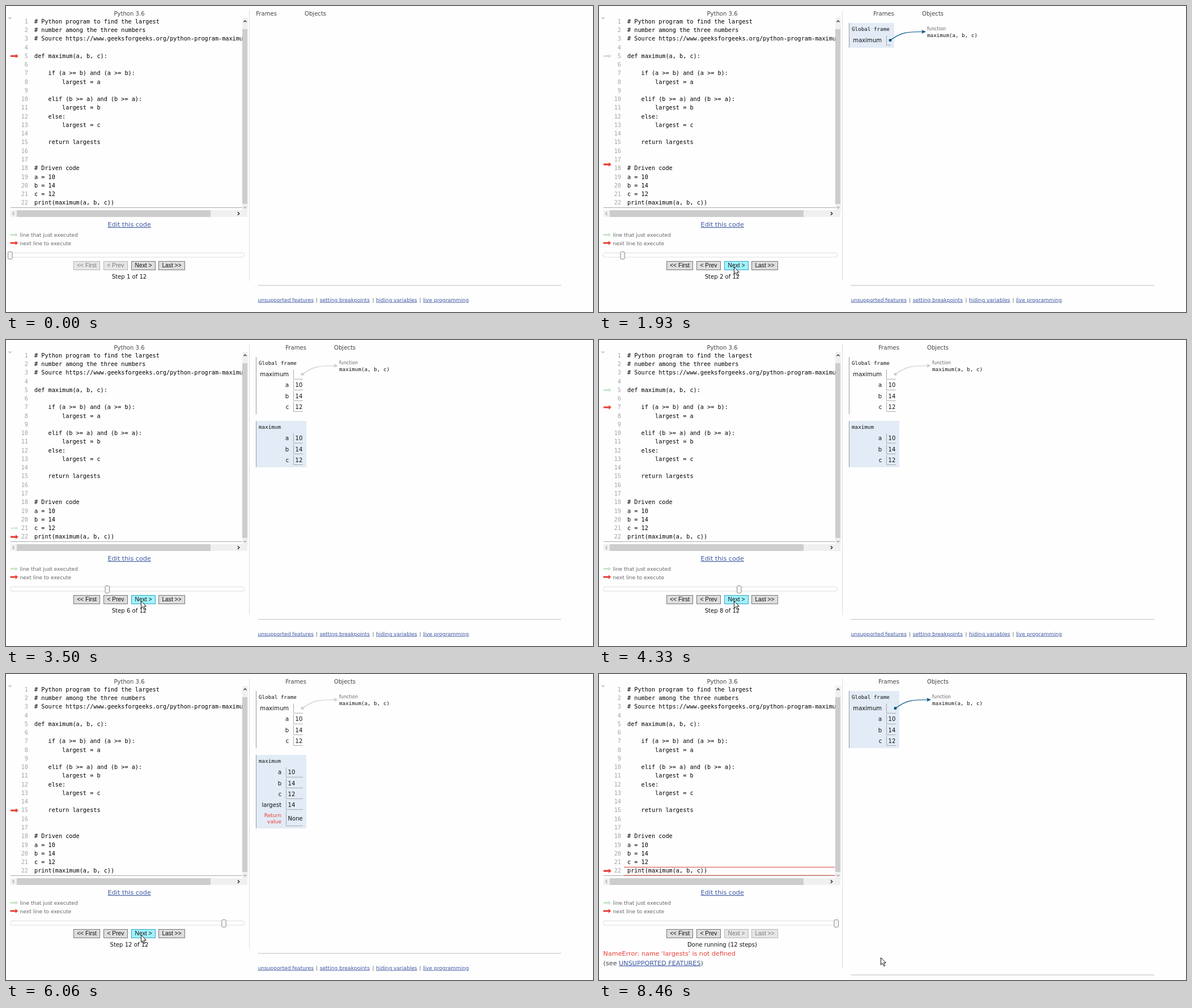
Write an HTML page that moves like this. It is 1036x541 px and loops after 8.5 s.

```html
<!DOCTYPE html>
<html lang="en">
<head>
<meta charset="utf-8">
<title>Code stepper</title>
<style>
html, body { margin: 0; width: 100%; height: 100%; overflow: hidden; background: #fefefe; }
svg { display: block; width: 1036px; height: 541px; }
text { white-space: pre; font-family: "DejaVu Sans", Verdana, sans-serif; font-size: 10.1px; fill: #111; }
.mono { font-family: "DejaVu Sans Mono", Consolas, monospace; }
.code { font-size: 10.2px; fill: #000; }
.num { font-size: 10.2px; fill: #a3a3a3; }
.small { font-size: 9.25px; }
.note { font-size: 9.12px; fill: #666; }
.head { fill: #444; }
.btn { font-family: "Liberation Sans", Arial, sans-serif; font-size: 10.25px; }
.link { fill: #3d58a2; text-decoration: underline; }
.big { font-size: 11.2px; }
</style>
</head>
<body>
<svg viewBox="0 0 1036 541" xmlns="http://www.w3.org/2000/svg">
  <defs>
    <clipPath id="clip"><rect x="0" y="0" width="416.5" height="361"/></clipPath>
    <polygon id="arrow" points="0,3 12,3 12,0 18,5 12,10 12,7 0,7" transform="scale(.765)"/>
  </defs>
  <g id="fixed"></g>
  <g id="view"></g>
  <use id="prev" href="#arrow" fill="#c9e6ca"/>
  <use id="next" href="#arrow" fill="#e93f34"/>
  <path id="cursor" d="M.5,.5V13.2L3.4,10.5L5.7,15.6L7.8,14.7L5.5,9.7H9.4Z" fill="#fff" stroke="#111" stroke-width="1"/>
</svg>
<script>
const LOOP = 8500;
const RED = "#e93f34";
const SOURCE = `# Python program to find the largest
# number among the three numbers
# Source https://www.geeksforgeeks.org/python-program-maximum-of-three-numbers/

def maximum(a, b, c):

    if (a >= b) and (a >= b):
        largest = a

    elif (b >= a) and (b >= a):
        largest = b
    else:
        largest = c

    return largests


# Driven code
a = 10
b = 14
c = 12
print(maximum(a, b, c))`.split("\n");

// Line to execute at each step, and the time of the click that leads to it
const LINES = [5, 19, 20, 21, 22, 5, 7, 10, 11, 15, 15, 15, 22];
const CLICKS = [0, 1555, 2080, 2580, 2990, 3440, 3870, 4325, 4790, 5260, 5660, 6055, 6850];
const PRESS = 130, FADE = 200, SLIDE = 250;
const LAST = LINES.length - 1;

const $ = id => document.getElementById(id);
const clamp = v => Math.max(0, Math.min(1, v));
const mix = (a, b, p) => a + (b - a) * p;
const inOut = p => p < .5 ? 4 * p ** 3 : 1 - 4 * (1 - p) ** 3;
const esc = s => s.replace(/&/g, "&amp;").replace(/</g, "&lt;").replace(/>/g, "&gt;");

const text = (x, y, s, cls = "", anchor = "start", extra = "") =>
  `<text x="${x}" y="${y}" class="${cls}" text-anchor="${anchor}" ${extra}>${esc(s)}</text>`;
const rect = (x, y, w, h, fill, extra = "") =>
  `<rect x="${x}" y="${y}" width="${w}" height="${h}" fill="${fill}" ${extra}/>`;
const path = (d, stroke, width = 1, extra = "") =>
  `<path d="${d}" fill="none" stroke="${stroke}" stroke-width="${width}" ${extra}/>`;

const baseline = n => 30.7 + (n - 1) * 15.27;
const arrowTop = n => 84.7 + (n - 5) * 15.27;

function drawFixed() {
  const code = SOURCE.map((s, i) =>
    text(39, baseline(i + 1), String(i + 1), "mono num", "end") +
    text(50, baseline(i + 1), s, "mono code")).join("");
  return text(217.5, 16.5, "Python 3.6", "head", "middle") +
    `<g clip-path="url(#clip)">${code}</g>` +
    path("M4.5,20L7,22.8L9.5,20", "#bbb", 1.4) +
    path("M8,356.5H417", "#aaa") +
    rect(417, 21, 10, 340, "#f0f0f0") + rect(417, 41, 9, 309, "#cdcdcd") +
    path("M419.5,28.5L422,25.8L424.5,28.5", "#444", 1.5) +
    path("M419.5,354.8L422,357.5L424.5,354.8", "#aaa", 1.3) +
    rect(8, 361, 418, 12, "#f0f0f0") + rect(19, 361, 342, 12, "#cdcdcd") +
    path("M14.5,364.3L11.8,367L14.5,369.7", "#aaa", 1.3) +
    path("M409,364.3L411.7,367L409,369.7", "#333", 1.6) +
    text(217.7, 390, "Edit this code", "link big", "middle") +
    `<use href="#arrow" x="0" y="0" transform="translate(7.5 400.7)" fill="#c9e6ca"/>` +
    `<use href="#arrow" transform="translate(7.5 415.2)" fill="${RED}"/>` +
    text(24.6, 408, "line that just executed", "note") +
    text(24.6, 422.7, "next line to execute", "note") +
    rect(7.5, 436.5, 413, 7.5, "#fff", 'rx="3" stroke="#ddd"');
}

function button(x, w, label, on, look) {
  const [fill, edge] = !on ? ["#e6e6e6", "#b5b5b5"]
    : look === "press" ? ["#33b2e4", "#2490bd"]
    : look === "hover" ? ["#a2f2fc", "#2fa3c8"] : ["#dddddd", "#777"];
  return rect(x, 451.5, w, 15, fill, `stroke="${edge}"`) +
    text(x + w / 2, 462.4, label, "btn", "middle", on ? "" : 'style="fill:#7a7a7a"');
}

function cell(right, sep, y, name, value, half = 8.5) {
  return text(sep - 8.3, y + 3.6, name, "", "end") +
    path(`M${sep},${y - half}V${y + half}H${right}`, "#aaa") +
    text(sep + 3, y + 3.6, value);
}

function box(y, bottom, right, title, active) {
  return (active ? rect(441, y, right - 441, bottom - y, "#e2ebf6") : "") +
    path(`M441.5,${y}V${bottom}`, "#999") +
    text(446, y + 13.8, title, "mono small");
}

function drawFrames(step) {
  const right = step === 0 ? 478 : step === 1 ? 521 : 530;
  let out = text(right, 16.5, "Frames", "head", "end") + text(right + 49, 16.5, "Objects", "head");
  if (!step) return out;

  const vars = [["a", "10"], ["b", "14"], ["c", "12"]];
  const globals = vars.slice(0, Math.min(3, step - 1));
  const inside = step >= 5 && step < LAST;
  const edge = right - 6;
  out += box(30, 73.8 + 19.1 * globals.length, right, "Global frame", !inside);
  out += cell(edge, 507.5, 60.8, "maximum", "");
  globals.forEach(([n, v], i) => out += cell(edge, 507.5, 79.8 + 19.1 * i, n, v));

  if (inside) {
    const returned = step === 11;
    const sep = returned ? 494.5 : 507.5;
    const locals = step >= 9 ? [...vars, ["largest", "14"]] : vars;
    out += box(143, returned ? 273 : 167.7 + 19.1 * locals.length, right, "maximum", true);
    locals.forEach(([n, v], i) => out += cell(edge, sep, 173.8 + 19.1 * i, n, v));
    if (returned) {
      const red = `style="fill:${RED}"`;
      out += cell(edge, sep, 255, "", "None", 13.5) +
        text(486, 253.2, "Return", "note", "end", red) +
        text(486, 264.2, "value", "note", "end", red);
    }
  }

  const ink = inside ? "#ccc" : "#005583";
  const x = right - 7, tip = right + 56;
  out += text(right + 58, 42.8, "function", "", "start", 'style="font-size:8.1px;fill:#666"') +
    text(right + 58, 55, "maximum(a, b, c)", "mono small") +
    `<circle cx="${x}" cy="60.5" r="2.5" fill="${ink}"/>` +
    path(`M${x},60.5C${x + 20},46 ${x + 30},45.5 ${tip - 5},45.5`, ink, 1.2) +
    `<path d="M${tip},45.5l-8,-3.5l2,3.5l-2,3.5z" fill="${ink}"/>`;
  return out;
}

function drawView(step, look) {
  const done = step === LAST, error = done || step === 10;
  const label = done ? "Done running (12 steps)" : `Step ${step + 1} of 12`;
  let out = rect(3.5 + 34.3 * step, 434.5, 7.5, 13, "#f6f6f6", 'rx="2" stroke="#888"') +
    button(119.5, 46, "<< First", step > 0) +
    button(172.5, 42, "< Prev", step > 0) +
    button(221.5, 42, "Next >", !done, look) +
    button(269.5, 46, "Last >>", !done) +
    text(217.5, 481.6, label, "", "middle") +
    path(`M429.5,8V${error ? 521 : 486}`, "#ddd") +
    path(`M444.5,${error ? 532 : 494}H980`, "#bbb");
  if (error) {
    const y = baseline(LINES[step]);
    out += path(`M44,${y - 9.9}H416.5M44,${y + 4.6}H416.5`, "#d2493f", 1.1) +
      text(7.6, 498, "NameError: name 'largests' is not defined", "big", "start", `style="fill:${RED}"`) +
      `<text x="7.6" y="514.6" class="big" style="fill:#444">(see <tspan class="link">UNSUPPORTED FEATURES</tspan>)</text>`;
  } else {
    [[444.5, "unsupported features"], [553.7, "setting breakpoints"],
     [653, "hiding variables"], [736, "live programming"]]
      .forEach(([x, s]) => out += text(x, 522.6, s, "note link", "start", 'style="fill:#3d58a2"'));
    [548.5, 648, 731].forEach(x => out += text(x, 522.6, "|", "note", "middle"));
  }
  return out + drawFrames(step);
}

// The return step nudges its arrow below the one of the line before
const target = i => arrowTop(LINES[i]) + (i === 11 ? 4 : 0);

function placeArrows(t, step) {
  let moved = 0;
  while (moved < step && t >= CLICKS[moved + 1] + FADE) moved++;
  const slide = inOut(clamp((t - CLICKS[moved] - FADE) / SLIDE));
  const y = moved ? mix(target(moved - 1), target(moved), slide) : target(0);
  $("next").setAttribute("transform", `translate(8 ${y})`);

  const shown = moved > 0 && moved < LAST;
  const fade = moved < step ? 1 - clamp((t - CLICKS[step]) / FADE) : 1;
  $("prev").setAttribute("opacity", shown ? fade : 0);
  if (shown) $("prev").setAttribute("transform", `translate(8 ${arrowTop(LINES[moved - 1])})`);
}

function pointer(t) {
  const into = inOut(clamp((t - 420) / 540));
  const away = inOut(clamp((t - 7740) / 720));
  return [mix(mix(998, 238, into), 497, away), mix(mix(327, 461, into), 501, away)];
}

let shownKey = "";
function draw(t) {
  let step = 0;
  while (step < LAST && t >= CLICKS[step + 1]) step++;

  const [x, y] = pointer(t);
  $("cursor").setAttribute("transform", `translate(${x} ${y})`);
  $("cursor").setAttribute("visibility", t < 460 ? "hidden" : "visible");

  const over = t >= 460 && x > 221 && x < 264 && y > 451 && y < 467;
  const pressed = step < LAST && t >= CLICKS[step + 1] - PRESS;
  const look = pressed ? "press" : over ? "hover" : "";
  const key = step + look;
  if (key !== shownKey) {
    $("view").innerHTML = drawView(step, look);
    shownKey = key;
  }
  placeArrows(t, step);
}

$("fixed").innerHTML = drawFixed();
const start = performance.now();
function tick() {
  draw((performance.now() - start) % LOOP);
  requestAnimationFrame(tick);
}
tick();
</script>
</body>
</html>
```
